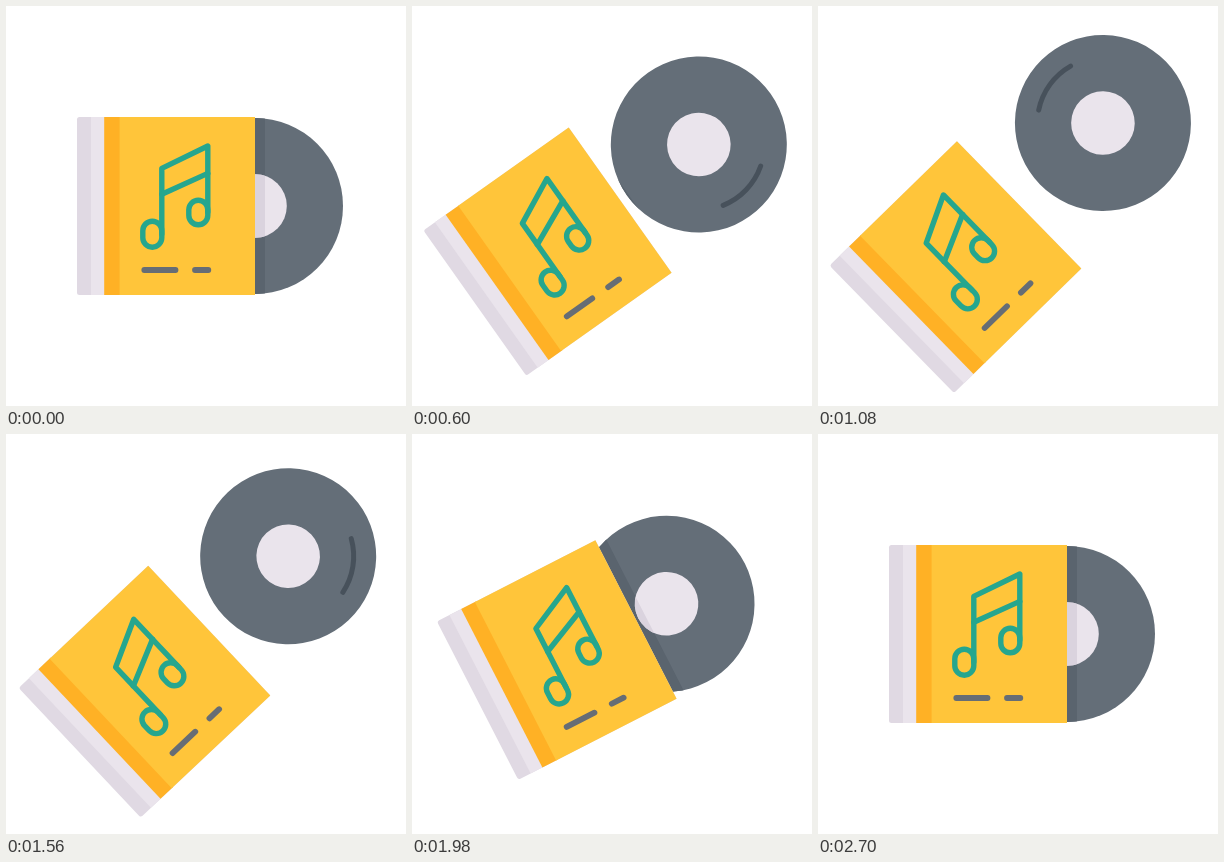
An HTML page with a canvas for the animation above (4.73 s loop, 400 px wide and 400 px high).

```html
<!DOCTYPE html>
<html lang="en">
<head>
<meta charset="utf-8">
<title>Album</title>
<style>
  html, body { margin: 0; width: 100%; height: 100%; overflow: hidden; background: #fff; }
  canvas { display: block; width: 100vw; height: 100vh; }
</style>
</head>
<body>
<canvas id="stage" width="400" height="400"></canvas>
<script>
const ctx = document.getElementById('stage').getContext('2d');
const LOOP = 4730, STEP = 30, RAD = Math.PI / 180;
const TURN = 1290, HIT = 2270, REST = 2700;

// Easing along a cubic Bezier with flat ends: handles (x1, 0) and (x2, 1).
const bezier = (x1, x2) => x => {
  let lo = 0, hi = 1;
  for (let i = 0; i < 24; i++) {
    const s = (lo + hi) / 2, r = 1 - s;
    if (3 * r * r * s * x1 + 3 * r * s * s * x2 + s * s * s < x) lo = s;
    else hi = s;
  }
  return lo * lo * (3 - 2 * lo);
};

const settle = bezier(0.33, 0.4);

// Moves from rest to far, back past rest to the rebound, then settles.
function swing(rest, far, rebound, out, back) {
  const mix = (a, b, k) => a + (b - a) * k;
  return t => {
    if (t < TURN) return mix(rest, far, out(t / TURN));
    if (t < HIT) return mix(far, rebound, back((t - TURN) / (HIT - TURN)));
    return mix(rebound, rest, settle(Math.min(1, (t - HIT) / (REST - HIT))));
  };
}

const slideOut = bezier(0.26, 0.1);
const tilt = swing(0, 45, -3.3, bezier(0.2, 0.19), bezier(0.93, 0.79));
const caseX = swing(-40, -88, -50.5, slideOut, bezier(0.55, 0.67));
const discX = swing(49, 119.6, 22.5, slideOut, bezier(0.67, 0.75));
const spin = t => 540 - 720 * Math.max(0, 1 - t / 2200) ** 1.4;

// Slight sideways drift while swinging back.
const swingBack = bezier(0.93, 0.79);
const drift = t => t < TURN || t > HIT ? 0 :
  -2.2 * Math.sin(Math.PI * swingBack((t - TURN) / (HIT - TURN)));

function rect(x, y, w, h, color) {
  ctx.fillStyle = color;
  ctx.fillRect(x, y, w, h);
}

function pen(color, width) {
  ctx.strokeStyle = color;
  ctx.lineWidth = width;
  ctx.lineCap = ctx.lineJoin = 'round';
}

function path(...pts) {
  ctx.beginPath();
  pts.forEach(([x, y]) => ctx.lineTo(x, y));
  ctx.stroke();
}

// Vertical capsule outline.
function loop(cx, top, bottom, r) {
  ctx.beginPath();
  ctx.arc(cx, top + r, r, Math.PI, 0);
  ctx.arc(cx, bottom - r, r, 0, Math.PI);
  ctx.closePath();
  ctx.stroke();
}

// Circle with the shadow strip that the case casts on it.
function plate(x, r, color, shade, edge) {
  ctx.save();
  ctx.beginPath();
  ctx.arc(x, 0, r, 0, 2 * Math.PI);
  ctx.fillStyle = color;
  ctx.fill();
  ctx.clip();
  rect(edge - 100, -90, 110, 180, shade);
  ctx.restore();
}

function drawDisc(x, edge, angle) {
  plate(x, 88, '#646e78', '#5a646e', edge);
  plate(x, 31.8, '#eae4ec', '#dad3de', edge);
  pen('#47515b', 5);
  ctx.beginPath();
  ctx.arc(x, 0, 65.5, (angle - 24.5) * RAD, (angle + 24.5) * RAD);
  ctx.stroke();
}

function drawNote() {
  const left = -4.2, right = 41.8;
  pen('#26a68e', 5.4);
  path([left, 28], [left, -37.6], [right, -60], [right, 6]);
  path([left, -11.7], [right, -32.6]);
  loop(left - 9.5, 15.2, 41.2, 9.5);
  loop(right - 9.5, -5.7, 18.8, 9.5);
}

function drawCase(x) {
  ctx.save();
  ctx.translate(x, 0);
  ctx.beginPath();
  ctx.moveTo(89, -89);
  ctx.arcTo(-89, -89, -89, 89, 2.5);
  ctx.arcTo(-89, 89, 89, 89, 2.5);
  ctx.lineTo(89, 89);
  ctx.closePath();
  ctx.fillStyle = '#e0d9e3';
  ctx.fill();
  rect(-75, -89, 15, 178, '#eae4ec');
  rect(-61.8, -89, 17, 178, '#ffb125');
  rect(-46.4, -89, 135.4, 178, '#ffc53a');

  drawNote();
  pen('#666d75', 5.8);
  path([-21.7, 64], [9.5, 64]);
  path([29, 64], [42.3, 64]);
  ctx.restore();
}

function draw(t) {
  const x = caseX(t);
  rect(0, 0, 400, 400, '#fff');
  ctx.save();
  ctx.translate(200, 200);
  ctx.rotate(-tilt(t) * RAD);
  ctx.translate(0, drift(t));
  drawDisc(discX(t), x + 89, spin(t));
  drawCase(x);
  ctx.restore();
}

const start = performance.now();
function frame() {
  const t = (performance.now() - start) % LOOP;
  draw(Math.floor(t / STEP) * STEP);
  requestAnimationFrame(frame);
}
frame();
</script>
</body>
</html>
```
